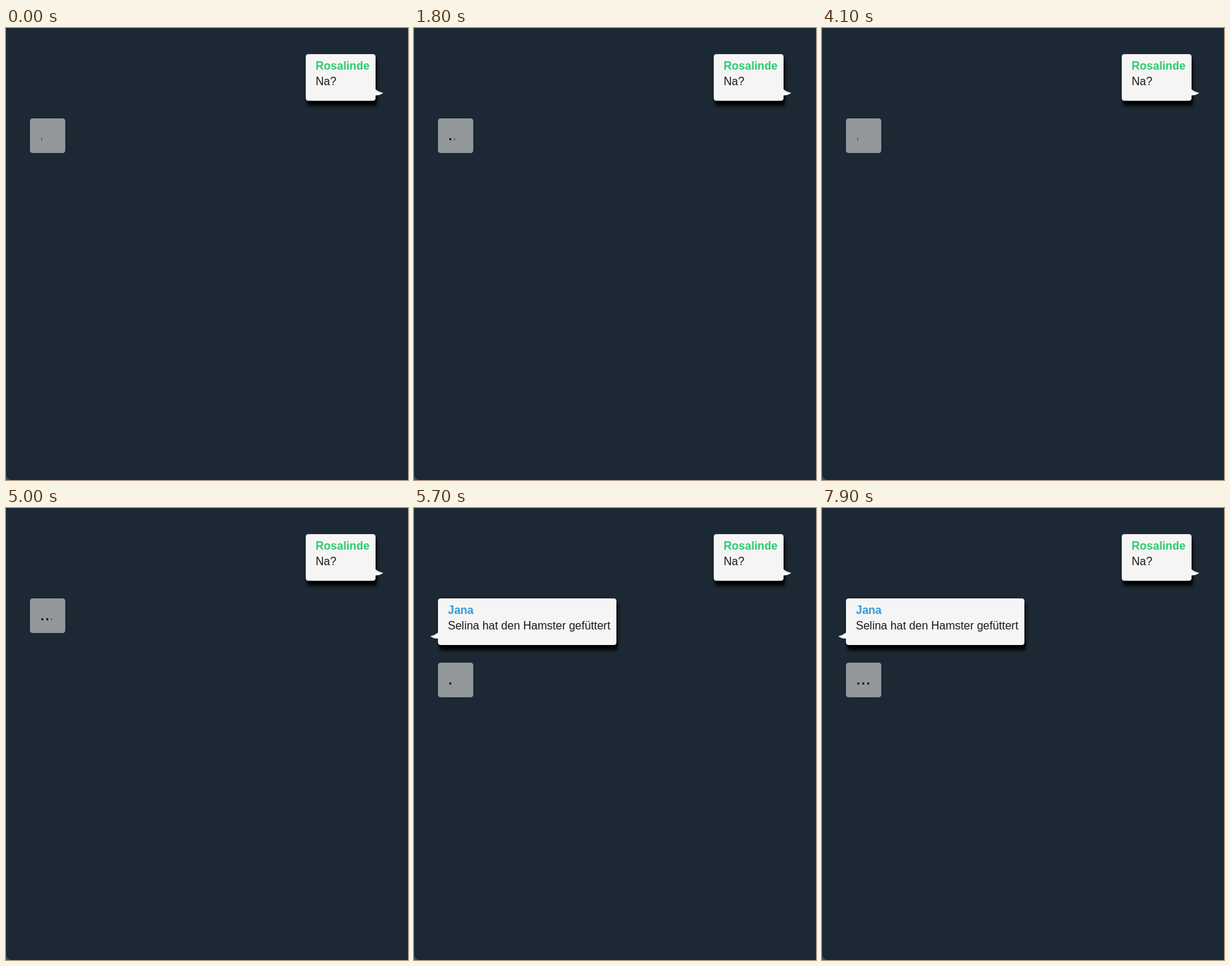
Write an HTML page with a canvas that moves like this. It is 570x640 px and loops after 8000 ms.

```html
<!DOCTYPE html>
<html lang="de">
<head>
<meta charset="utf-8">
<title>Chat</title>
<style>
html, body { margin: 0; width: 100%; height: 100%; overflow: hidden; background: #1c2833; }
canvas { display: block; }
</style>
</head>
<body>
<canvas id="stage" width="570" height="640"></canvas>
<script>
// an opaque canvas allows subpixel text
const ctx = document.getElementById('stage').getContext('2d', { alpha: false });
const LOOP = 8000;
const REPLY_AT = 5700;
const CYCLE = 1356;         // one run of the three typing dots
const PHASE = 215;
const DOT_STARTS = [200, 641, 1097];
const COLUMN_STEP = 96;     // each dot is uncovered column by column
const FONT = '"Liberation Sans", Arial, sans-serif';

function roundBox(x, y, w, h, color) {
  ctx.fillStyle = color;
  ctx.beginPath();
  ctx.roundRect(x, y, w, h, 4);
  ctx.fill();
}

function text(str, x, y, color, weight = '') {
  ctx.font = `${weight} 16px ${FONT}`;
  ctx.fillStyle = color;
  ctx.fillText(str, x, y);
}

// dir is 1 for a tail to the right, -1 for one to the left
function tail(x, y, dir) {
  ctx.beginPath();
  ctx.moveTo(x, y);
  ctx.quadraticCurveTo(x + 5 * dir, y + 4, x + 11 * dir, y + 5);
  ctx.quadraticCurveTo(x + 6 * dir, y + 8.5, x, y + 8.5);
  ctx.fill();
}

function bubble(x, y, w, dir, name, color, message) {
  ctx.save();
  ctx.shadowColor = '#000';
  ctx.shadowOffsetX = 2;
  ctx.shadowOffsetY = 7;
  ctx.shadowBlur = 4;
  roundBox(x, y, w, 66, '#f5f5f5');
  ctx.restore();
  ctx.fillStyle = '#f5f5f5';
  if (dir > 0) tail(x + w, y + 50, dir);
  else tail(x, y + 48.5, dir);
  text(name, x + 14, y + 22, color, 'bold');
  text(message, x + 14, y + 44, '#1a1a1a');
}

function dot(x, y, columns, colors) {
  for (let i = 0; i < columns; i++) {
    ctx.fillStyle = colors[i];
    ctx.fillRect(x + i, y, 1, 3);
  }
}

function typing(y, t) {
  roundBox(34, y, 50, 49, '#92979b');
  const elapsed = (t + PHASE) % CYCLE;
  DOT_STARTS.forEach((start, i) => {
    const columns = Math.floor((elapsed - start) / COLUMN_STEP) + 1;
    const edge = i ? '#3a3c3e' : '#4a3610';
    dot(50 + 7 * i, y + 28, Math.min(3, columns), [edge, '#0a0a0a', '#2e3840']);
  });
}

function draw(t) {
  ctx.fillStyle = '#46515b';
  ctx.fillRect(0, 0, 570, 640);
  ctx.fillStyle = '#1c2833';
  ctx.beginPath();
  ctx.roundRect(0, 0, 570, 640, [0, 0, 0, 8]);
  ctx.fill();

  bubble(425, 37, 99, 1, 'Rosalinde', '#2ecc71', 'Na?');
  const replied = t >= REPLY_AT;
  if (replied) {
    bubble(34, 128, 253, -1, 'Jana', '#3498db', 'Selina hat den Hamster gefüttert');
  }
  typing(replied ? 219 : 128, t);
}

const begin = performance.now();
function tick() {
  draw((performance.now() - begin) % LOOP);
  requestAnimationFrame(tick);
}
tick();
</script>
</body>
</html>
```
